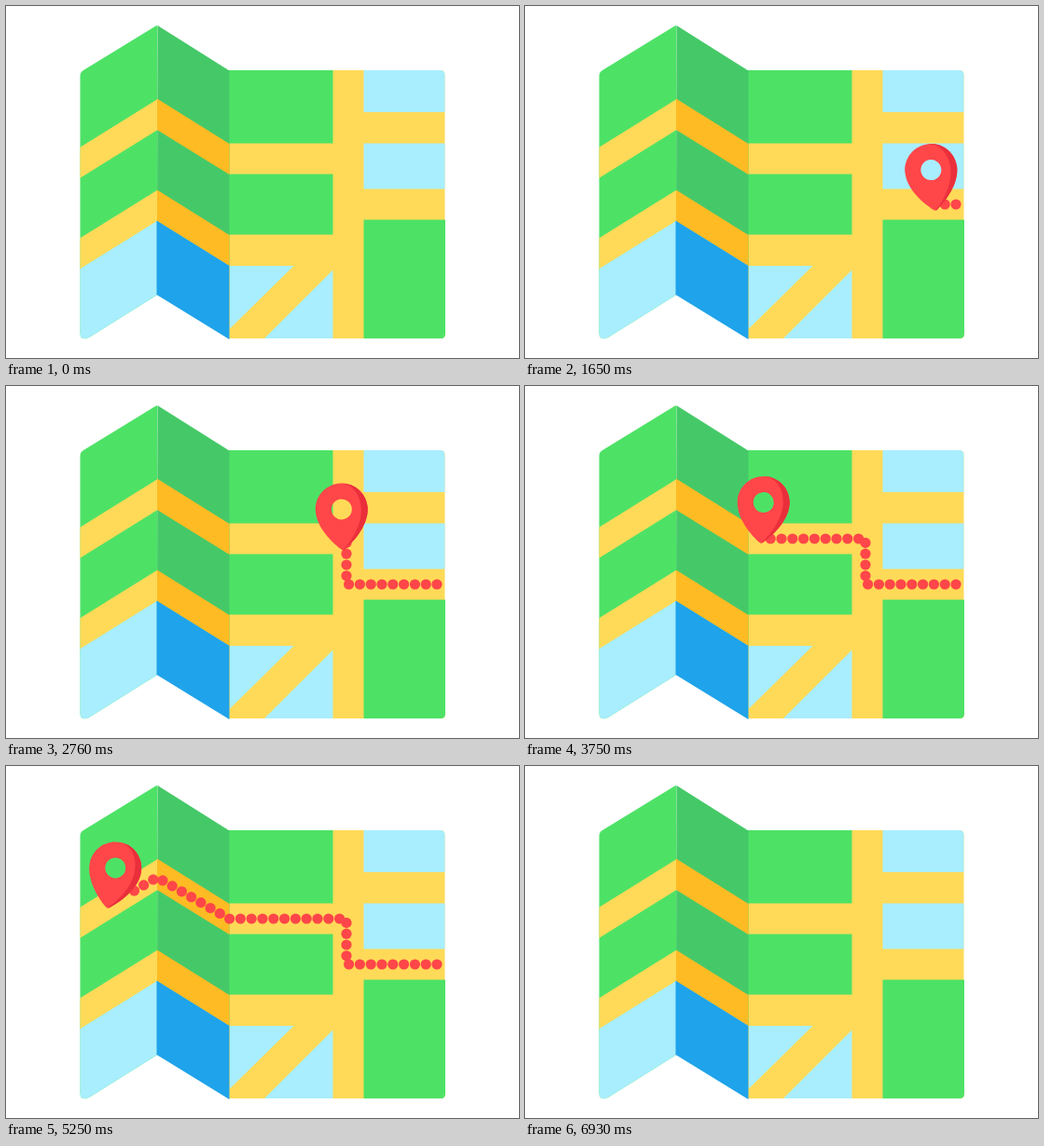
Write an HTML page that moves like this. It is 550 px wide and 378 px high and loops after 6.96 s.

```html
<!DOCTYPE html>
<html lang="en">
<head>
<meta charset="utf-8">
<title>Map route</title>
<style>
  html, body { margin: 0; width: 100%; height: 100%; overflow: hidden; background: #fff; }
  svg { display: block; width: 550px; height: 378px; }
  .green { fill: #4de266; }
  .shade { fill: #45c968; }
  .road { fill: #ffda58; }
  .road-shade { fill: #ffbb24; }
  .water { fill: #a8eefe; }
  .water-shade { fill: #1fa3ea; }
  .red { fill: #ff4649; }
  .red-shade { fill: #ea2f3b; }
</style>
</head>
<body>
<svg viewBox="0 0 550 378">
  <defs>
    <clipPath id="left"><path d="M79.5 75Q79.5 71 83 69L160.5 21.5 162.5 21V310L89 356Q79.5 360 79.5 351Z"/></clipPath>
    <clipPath id="right"><path d="M239 69H465.500Q470.500 69 470.500 74V229.500H471V352Q471 357 466 357H239Z"/></clipPath>
  </defs>

  <g clip-path="url(#right)">
    <path class="road" d="M239 69H471V357H239Z"/>
    <path class="green" d="M239 69H350.500V147.500H239ZM239 180.500H350.500V245.500H239ZM383.500 229.500H471V357H383.500Z"/>
    <path class="water" d="M383.500 69H471V114H383.500ZM383.500 147.500H471V196.500H383.500ZM240 279H308.500L240 346.500ZM350.500 283.500V357H277Z"/>
  </g>

  <g clip-path="url(#left)">
    <path class="green" d="M79 20H162.500V360H79Z"/>
    <path class="road" d="M79 152L162.500 100V133L79 185ZM79 249.500L162.500 197.500V231L79 283Z"/>
    <path class="water" d="M79 282.500L162.500 230.500V360H79Z"/>
  </g>

  <path class="shade" d="M162.500 21Q163.500 21 165 22.500L239.500 69.500V279L162 231Z"/>
  <path class="road-shade" d="M162 99.500L239.500 148V181L162 133ZM162 197.500L239.500 246V279L162 231Z"/>
  <path class="water-shade" d="M161.500 230.500L239.500 279V358L161.500 310Z"/>

  <path id="route" fill="none" d="M462 213H365V164H239L162 119.500 54 183"/>
  <path id="flight" fill="none" d="M505 184L435 176H361V133L345 125H242L175 82.500 164 79 46 156"/>
  <g id="dots" class="red"></g>

  <g id="pin">
    <path class="red" fill-rule="evenodd" d="M0-28C15.500-28 28-15.500 28 0C28 18 12 35 2 43Q0 44.500-2 43C-12 35-28 18-28 0C-28-15.500-15.500-28 0-28ZM0-11A11 11 0 1 0 0 11A11 11 0 1 0 0-11Z"/>
    <path class="red-shade" d="M0-28C15.500-28 28-15.500 28 0C28 18 12 35 2 43Q1 44 0 43.800C9 35 21 18 21 0C21-14 13-27 0-28Z"/>
  </g>
</svg>
<script>
const LOOP = 6960, STEP = 11.8, COUNT = 41;
const [route, flight, layer, pin] = ['route', 'flight', 'dots', 'pin'].map(id => document.getElementById(id));

const ramp = (t, from, to) => Math.min(1, Math.max(0, (t - from) / (to - from)));

// Speeds up evenly, then holds a constant speed.
function travelled(t) {
  const start = 520, rampTime = 950, speed = 0.1069;
  const u = Math.max(0, t - start);
  return speed * (u < rampTime ? u * u / (2 * rampTime) : u - rampTime / 2);
}

// Index of the newest dot; the trail slows down a little as it grows.
function newestDot(t) {
  const u = t - 1470;
  return u * (0.0103 - 4.1e-7 * u);
}

const oldestDot = t => 0.0352 * (t - 5770);

const dots = Array.from({ length: COUNT }, (_, i) => {
  const dot = document.createElementNS('http://www.w3.org/2000/svg', 'circle');
  const { x, y } = route.getPointAtLength(i * STEP);
  dot.setAttribute('cx', x);
  dot.setAttribute('cy', y);
  dot.setAttribute('r', 5.6);
  layer.append(dot);
  return dot;
});

const show = (node, visible) => node.setAttribute('visibility', visible ? 'visible' : 'hidden');

function draw() {
  const t = performance.now() % LOOP;
  const { x, y } = flight.getPointAtLength(travelled(t));
  const tilt = 0.056 * (319 - x);
  const size = ramp(t, 560, 780) - ramp(t, 5980, 6200);
  pin.setAttribute('transform', `translate(${x} ${y}) rotate(${tilt}) scale(${size})`);
  show(pin, size > 0);

  const first = oldestDot(t), last = newestDot(t);
  dots.forEach((dot, i) => show(dot, i >= first && i <= last));
  requestAnimationFrame(draw);
}
draw();
</script>
</body>
</html>
```
